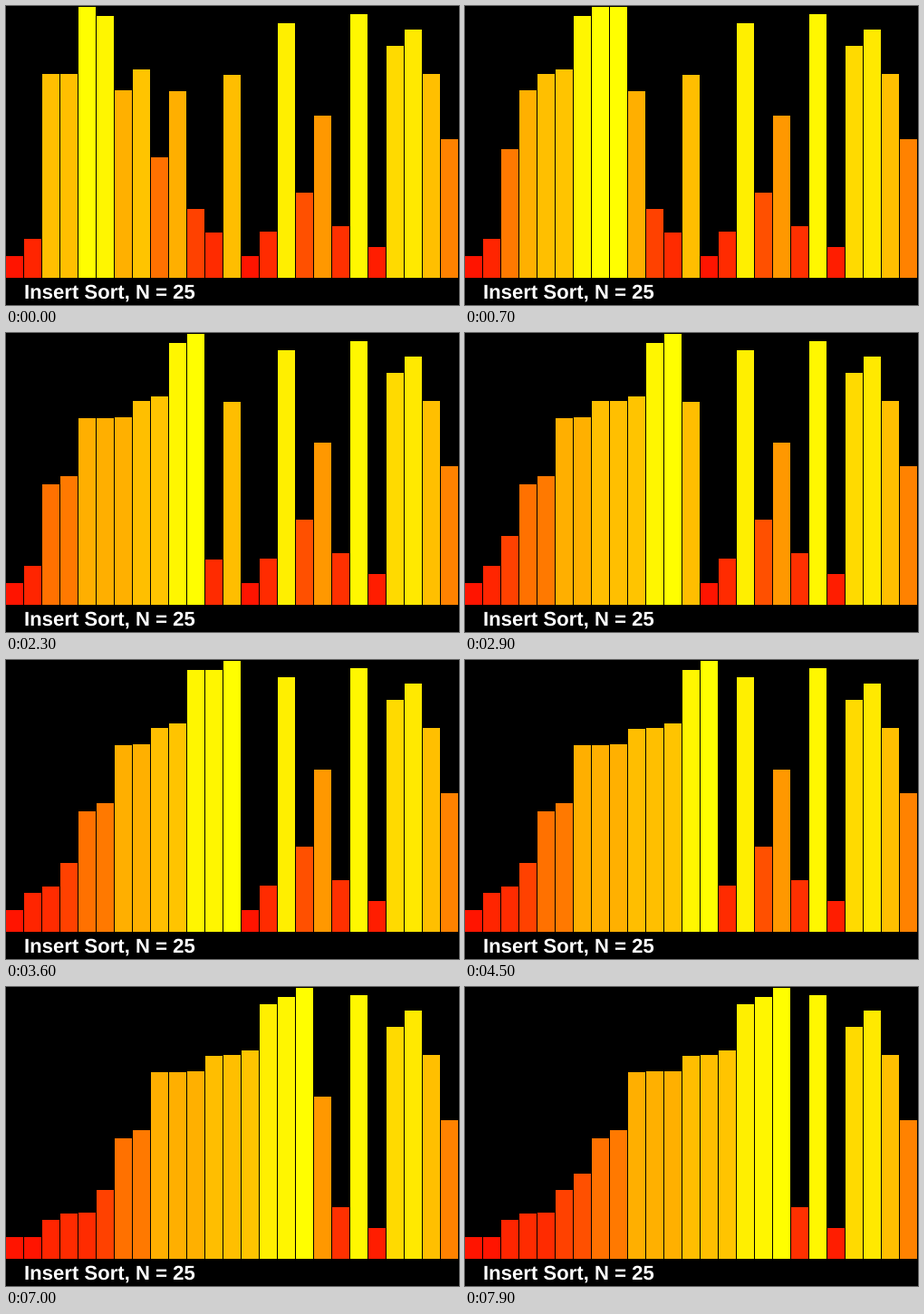
A matplotlib script that plays this animation: 500x330 px, repeating every 8000 ms.

```python
from itertools import islice

import matplotlib.pyplot as plt
from matplotlib.animation import FuncAnimation

plt.rcParams["text.hinting"] = "no_hinting"

W, H, DPI = 500, 330, 100
FLOOR, SLOT, GAP = 300, 20, 1
FRAMES, STEP_MS = 80, 100

# The unsorted input; every pose follows from sorting it.
heights = [24, 43, 225, 142, 299, 289, 207, 230, 133, 206, 76, 50, 224,
           24, 51, 281, 94, 179, 57, 291, 34, 256, 274, 225, 153]


def insert_sort(values):
    """Yield a snapshot after every shift; the held value drops in silently."""
    a = list(values)
    for i in range(1, len(a)):
        held, j = a[i], i
        while j > 0 and a[j - 1] > held:
            a[j] = a[j - 1]
            j -= 1
            yield list(a)
        a[j] = held


states = list(islice(insert_sort(heights), FRAMES))

fig = plt.figure(figsize=(W / DPI, H / DPI), dpi=DPI, facecolor="black")
ax = fig.add_axes([0, 0, 1, 1])
ax.set_xlim(0, W)
ax.set_ylim(H, 0)
ax.axis("off")

bars = [
    ax.add_patch(plt.Rectangle((i * SLOT, FLOOR), SLOT - GAP, 0,
                               linewidth=0, antialiased=False))
    for i in range(len(heights))
]
ax.text(20, 323, f"Insert Sort, N = {len(heights)}", color="white",
        family="Liberation Sans", weight="bold",
        fontsize=22.2 * 72 / DPI, va="baseline")


def update(frame):
    for bar, h in zip(bars, states[frame]):
        bar.set_y(FLOOR - h)
        bar.set_height(h)
        bar.set_facecolor((1, h / FLOOR, 0))
    return bars


anim = FuncAnimation(fig, update, frames=FRAMES, interval=STEP_MS,
                     repeat=True, repeat_delay=0, blit=False)
plt.show()
```
